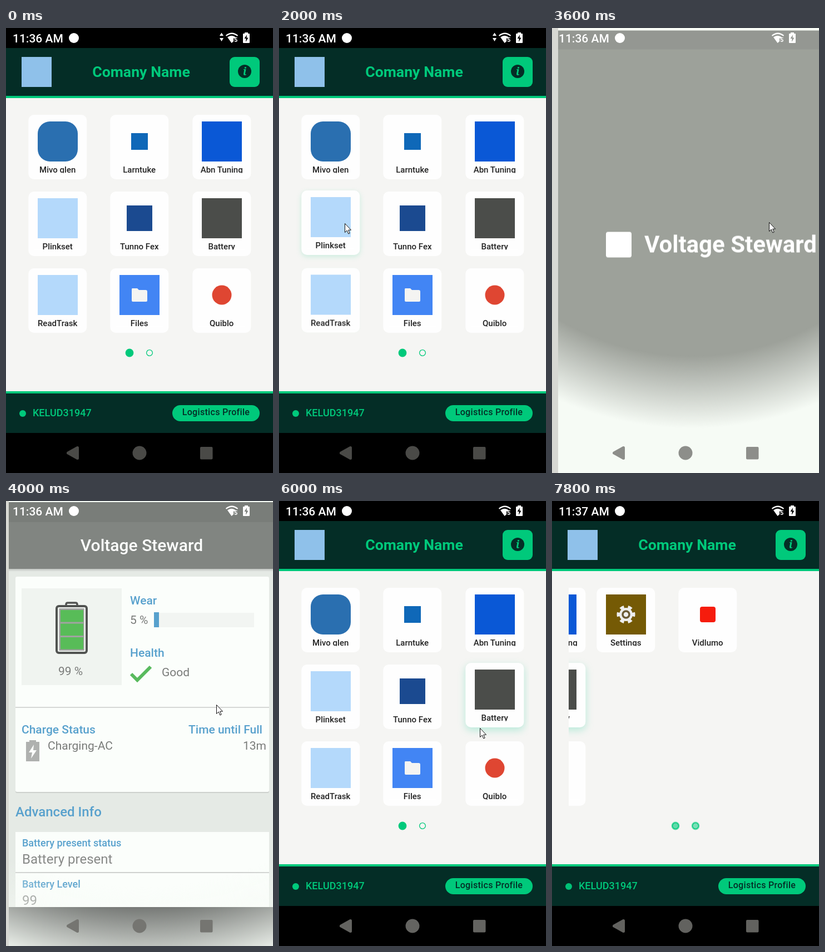
These frames come from a looping animation (480x800 px, 8 s). An HTML page:

```html
<!DOCTYPE html>
<html lang="en">
<head>
<meta charset="utf-8">
<title>Launcher demo</title>
<style>
html, body { margin: 0; width: 100%; height: 100%; overflow: hidden; background: #d7d8d3; }
svg { display: block; width: 480px; height: 800px; font-family: Roboto, sans-serif; }
text { font-size: 21px; }
.m { font-weight: 500; }
.b { font-weight: 700; }
.mid { text-anchor: middle; }
.end { text-anchor: end; }
.green { fill: #00c97b; }
.deep { fill: #042d26; }
.blue { fill: #0a74b8; }
.label { font-size: 15px; font-weight: 500; text-anchor: middle; fill: #222; }
.small { font-size: 18px; font-weight: 500; }
.value { font-size: 24px; fill: #505050; }

/* The script sets the time of every animation. */
#home, #app, #pages, .splash, #veil, #halo, #cursor, #nav, #old, #new, #up, #down, .on, .off {
  animation: 8s linear infinite paused;
}
#home { animation-name: home; }
#app { animation-name: app; }
#pages { animation-name: pages; }
.splash { animation-name: splash; }
#veil { animation-name: veil; }
#halo { animation-name: halo; transform-origin: 240px 120px; }
#cursor { animation-name: cursor; }
#nav { fill: currentColor; animation-name: nav; animation-timing-function: step-end; }
#old { animation-name: old; animation-timing-function: step-end; }
#new { animation-name: new; animation-timing-function: step-end; }
#up { animation-name: up; animation-timing-function: step-end; }
#down { animation-name: down; animation-timing-function: step-end; }
.on { animation-name: first; }
.off { animation-name: second; }
#pulse { animation: pulse 2s ease-in-out infinite paused; }
.pass { animation: pass 600ms linear var(--at) both paused; }
.stay { animation: stay 300ms linear var(--at) both paused; }

/* The app fades in over home, then both slide right until home is back. */
@keyframes home {
  0%, 42.5% { transform: none; opacity: 1; }
  45%, 57.5% { transform: none; opacity: 0; }
  60%, 62.5% { transform: translateX(-504px); opacity: 1; }
  65% { transform: translateX(-440px); }
  67.5% { transform: translateX(-296px); }
  70% { transform: translateX(-116px); }
  72.5% { transform: translateX(-20px); }
  75%, 100% { transform: translateX(0); opacity: 1; }
}
@keyframes app {
  0%, 38.75% { transform: translate(20px, 8px); opacity: 0; }
  45% { transform: translate(11px, 4.5px); opacity: 1; }
  50% { transform: translate(5px, 2px); }
  55%, 62.5% { transform: translate(0, 0); }
  65% { transform: translate(64px, 0); }
  67.5% { transform: translate(208px, 0); }
  70% { transform: translate(388px, 0); }
  72.5% { transform: translate(484px, 0); }
  75%, 100% { transform: translate(504px, 0); opacity: 1; }
}
@keyframes pages {
  0%, 77.5% { transform: translateX(0); }
  80% { transform: translateX(-180px); }
  82.5% { transform: translateX(-390px); }
  85%, 95% { transform: translateX(-420px); }
  97.5% { transform: translateX(-380px); }
  100% { transform: translateX(-200px); }
}
@keyframes first {
  0%, 78% { opacity: 1; }
  82.5%, 95% { opacity: 0; }
  97.5% { opacity: .6; }
  100% { opacity: 1; }
}
@keyframes second {
  0%, 78% { opacity: 0; }
  82.5%, 95% { opacity: 1; }
  97.5% { opacity: .5; }
  100% { opacity: 0; }
}
@keyframes splash { 0%, 45% { opacity: 1; } 50%, 100% { opacity: 0; } }
@keyframes veil {
  0%, 40% { opacity: .6; }
  45% { opacity: .46; }
  50% { opacity: .33; }
  60%, 100% { opacity: 0; }
}
@keyframes halo {
  0%, 40% { transform: scale(.75); }
  45% { transform: scale(1); }
  50% { transform: scale(1.23); }
  60%, 100% { transform: scale(1.8); }
}
@keyframes cursor {
  0%, 10% { transform: translate(180px, 830px); }
  12.5% { transform: translate(172px, 754px); }
  17.5% { transform: translate(142px, 545px); }
  22.5% { transform: translate(120px, 415px); }
  25% { transform: translate(118px, 351px); }
  29% { transform: translate(150px, 346px); }
  35% { transform: translate(388px, 346px); }
  45% { transform: translate(390px, 349px); }
  50% { transform: translate(378px, 366px); }
  60%, 62.5% { transform: translate(238px, 757px); }
  67.5% { transform: translate(278px, 528px); }
  72.5% { transform: translate(350px, 412px); }
  77.5% { transform: translate(372px, 404px); }
  82.5%, 85% { transform: translate(265px, 401px); }
  90% { transform: translate(340px, 560px); }
  92.5% { transform: translate(448px, 757px); }
  95%, 100% { transform: translate(450px, 830px); }
}
@keyframes nav {
  0% { color: #4a4a47; }
  42.5% { color: #8d8e8a; }
  47.5% { color: #757571; }
  55% { color: #646461; }
  97.5%, 100% { color: #62625f; }
}
@keyframes old { 0% { opacity: 1; } 77.5%, 100% { opacity: 0; } }
@keyframes new { 0% { opacity: 0; } 77.5%, 100% { opacity: 1; } }
@keyframes up { 0% { opacity: 1; } 27.5%, 100% { opacity: 0; } }
@keyframes down { 0% { opacity: 1; } 5% { opacity: 0; } 12.5% { opacity: 1; } 27.5%, 100% { opacity: 0; } }
@keyframes pulse { 50% { opacity: .5; } }
@keyframes pass {
  0%, 100% { transform: none; filter: drop-shadow(0 0 0 rgba(0, 201, 123, 0)); }
  40%, 60% { transform: translateY(-3px); filter: drop-shadow(0 5px 7px rgba(0, 201, 123, .25)); }
}
@keyframes stay {
  from { transform: none; filter: drop-shadow(0 0 0 rgba(0, 201, 140, 0)); }
  to { transform: translateY(-3px); filter: drop-shadow(0 5px 7px rgba(0, 201, 140, .25)); }
}
</style>
</head>
<body>
<svg viewBox="0 0 480 800">
  <defs>
    <clipPath id="grid"><rect x="30" y="130" width="420" height="440"/></clipPath>
    <clipPath id="window"><rect y="-10" width="480" height="820"/></clipPath>
    <radialGradient id="ring" gradientUnits="userSpaceOnUse" cx="240" cy="120" r="595">
      <stop offset=".78" stop-color="#f6fbf5" stop-opacity="0"/>
      <stop offset="1" stop-color="#f6fbf5"/>
    </radialGradient>
    <linearGradient id="edge" x2="0" y2="1">
      <stop stop-color="#000" stop-opacity=".25"/>
      <stop offset="1" stop-color="#000" stop-opacity="0"/>
    </linearGradient>
  </defs>

  <rect width="480" height="800" fill="#d7d8d3"/>
  <g id="home">
    <rect width="480" height="800"/>
    <rect y="36" width="480" height="692" class="deep"/>
    <rect y="122" width="480" height="535" class="green"/>
    <rect y="126" width="480" height="527" fill="#f5f5f3"/>
    <rect x="28" y="52" width="54" height="54" fill="#8fc1ea"/>
    <text x="243" y="88" class="b mid green" style="font-size:26.7px">Comany Name</text>
    <rect x="402" y="52" width="54" height="54" rx="9" class="green"/>
    <circle cx="429" cy="78" r="12" class="deep"/>
    <text x="429" y="85" class="b mid green" style="font:italic 700 19px 'Noto Serif',serif">i</text>

    <g clip-path="url(#grid)"><g id="pages"></g></g>

    <g fill="none" stroke="#00c97b" stroke-width="1.3">
      <circle cx="222" cy="584" r="5.4"/><circle cx="258" cy="584" r="5.4"/>
    </g>
    <circle cx="222" cy="584" r="7.4" class="green on"/>
    <circle cx="258" cy="584" r="7.4" class="green off"/>

    <circle id="pulse" cx="30" cy="693" r="6" class="green"/>
    <text x="48" y="698" class="small green">KELUD31947</text>
    <rect x="299" y="678" width="157" height="29" rx="14.5" class="green"/>
    <text x="377.5" y="696" class="m mid deep" style="font-size:16px;letter-spacing:.3px">Logistics Profile</text>
  </g>

  <g id="app"><g clip-path="url(#window)">
    <rect y="-10" width="480" height="20" fill="#f6fbf5"/>
    <rect width="480" height="800" fill="#dde0dd"/>
    <rect width="480" height="36" fill="#3c3e3b"/>
    <rect y="36" width="480" height="84" fill="#484a48"/>
    <rect y="120" width="480" height="5" fill="url(#edge)"/>
    <text x="239" y="88" class="m mid" fill="#fff" style="font-size:30px">Voltage Steward</text>

    <rect x="12" y="135" width="456" height="388" rx="3" fill="#b9bcb9"/>
    <rect x="12" y="134" width="456" height="387" rx="3" fill="#fdfefd"/>
    <rect x="12" y="368" width="456" height="2" fill="#c6c6c6"/>
    <rect x="23" y="155" width="180" height="174" fill="#edf0ed"/>
    <path d="M103 186V184Q103 181 106 181H120Q123 181 123 184V186" fill="none" stroke="#000" stroke-width="3.5"/>
    <rect x="86" y="187" width="54" height="84" rx="4" fill="#edf0ed" stroke="#000" stroke-width="4"/>
    <rect x="90.5" y="191" width="45" height="76" fill="#777"/>
    <g fill="#0a9c0a">
      <rect x="93" y="194" width="41" height="21.5"/>
      <rect x="93" y="218.5" width="41" height="21.5"/>
      <rect x="93" y="243" width="41" height="21.5"/>
    </g>
    <g fill="#3c3c3c">
      <text x="111" y="311" class="mid">99 %</text>
      <text x="218" y="219">5 %</text>
      <text x="275" y="313">Good</text>
      <text x="70" y="445">Charging-AC</text>
      <text x="463" y="445" class="end">13m</text>
    </g>
    <g class="blue m">
      <text x="218" y="184">Wear</text>
      <text x="218" y="278">Health</text>
      <text x="23" y="416">Charge Status</text>
      <text x="456" y="416" class="end">Time until Full</text>
      <text x="12" y="565" style="font-size:24px">Advanced Info</text>
    </g>
    <rect x="261" y="199" width="180" height="26" fill="#eff1ef"/>
    <rect x="261" y="198" width="9" height="27" class="blue"/>
    <path d="M220 309L231 320L255 296" fill="none" stroke="#0a9a12" stroke-width="6"/>
    <path d="M31 431H37V428H49V431H55V466H31Z" fill="#8c8c8c"/>
    <path d="M45 436L36 450H42L40 461L50 446H44Z" fill="#fff"/>

    <rect x="12" y="593" width="456" height="135" fill="#fdfefd"/>
    <rect x="12" y="665" width="456" height="2" fill="#bcbcbc"/>
    <text x="24" y="619" class="small blue">Battery present status</text>
    <text x="24" y="650" class="value">Battery present</text>
    <text x="24" y="693" class="small blue">Battery Level</text>
    <text x="24" y="724" class="value">99</text>
    <rect y="728" width="480" height="72"/>

    <g class="splash">
      <rect width="480" height="800" fill="#51544e"/>
      <rect width="480" height="34" fill="#40433e"/>
    </g>
    <rect id="veil" y="-10" width="480" height="820" fill="#f6fbf5"/>
    <rect id="halo" x="-900" y="-900" width="2400" height="2400" fill="url(#ring)"/>
    <g class="splash" fill="#fff">
      <rect x="86" y="362" width="46" height="46" rx="4"/>
      <text x="155" y="399" class="b" style="font-size:42px">Voltage Steward</text>
    </g>
  </g></g>

  <g fill="#fff">
    <text id="old" x="12" y="26" class="m">11:36 AM</text>
    <text id="new" x="12" y="26" class="m">11:37 AM</text>
    <circle cx="122" cy="18" r="9"/>
    <path id="up" d="M384 14L387.5 8.5L391 14Z"/>
    <path id="down" d="M384 18L387.5 24L391 18Z"/>
    <path d="M395.5 14Q406 5.500 416.5 14" fill="none" stroke="#fff" stroke-width="2.2"/>
    <path d="M398 16.5Q405.5 11 413 16.5L411 18.5H409V24L405.5 27Z"/>
    <text x="410" y="25" class="b" style="font-size:11px">5</text>
    <path fill-rule="evenodd" d="M429 8H435V10H437Q438 10 438 11V26Q438 27 437 27H427Q426 27 426 26V11Q426 10 427 10H429ZM433 12L428.5 19H431.5L431 25L435.5 17.5H432.5Z"/>
  </g>
  <g id="nav">
    <path d="M111.500 764L128.500 754.500V773.500Z" stroke="currentColor" stroke-width="5" stroke-linejoin="round"/>
    <circle cx="240" cy="764" r="12.5"/>
    <rect x="349" y="753" width="22.5" height="22.5" rx="2"/>
  </g>
  <path id="cursor" d="M.5 .5V16.5L4.2 13L6.8 19L9.2 18L6.7 12.2H11.5Z" fill="#fff" stroke="#111"/>
</svg>
<script>
const square = (size, fill, radius = 0) =>
  `<rect x="${53 - size / 2}" y="${48 - size / 2}" width="${size}" height="${size}" rx="${radius}" fill="${fill}"/>`;
const disc = (r, attrs) => `<circle cx="53" cy="48" r="${r}" ${attrs}/>`;
const folder = '<path d="M40 36H49L52 39H64Q67 39 67 42V58Q67 60 65 60H41Q39 60 39 58V38Q39 36 40 36Z" fill="#f4f4f2"/>';
const gear = disc(12, 'fill="#eee"') +
  disc(13.5, 'fill="none" stroke="#eee" stroke-width="6" pathLength="12" stroke-dasharray="1 1" stroke-dashoffset=".5"') +
  disc(6, 'fill="#eee" stroke="#6a5a35" stroke-width="3.5"');

const first = [
  ['Mivo glen', square(72, '#2a6fb0', 22)],
  ['Larntuke', square(30, '#0f68b8')],
  ['Abn Tuning', square(72, '#0a58d6')],
  ['Plinkset', square(72, '#b4d9fb'), 'pass', 1840],
  ['Tunno Fex', square(46, '#1b4a90'), 'pass', 2350],
  ['Battery', square(72, '#4b4d4a'), 'stay', 2600],
  ['ReadTrask', square(72, '#b4d9fb'), 'pass', 1440],
  ['Files', square(72, '#4285f4') + folder],
  ['Quiblo', disc(17.5, 'fill="#df4632"')],
];
const second = [
  ['Settings', square(72, '#755a05') + gear],
  ['Vidlumo', square(28, '#f61c0d', 4)],
];

// The strip at the foot of each tile cuts off the descenders.
const tile = left => ([name, icon, hover = '', at = 0], i) =>
  `<g transform="translate(${left + Math.floor(i % 3 * 147.5)} ${156 + Math.floor(i / 3) * 138})">
    <g class="${hover}" style="--at:${at}ms">
      <rect x=".3" width="105" height="116" rx="10" fill="#fefefe"/>${icon}
      <text x="52.7" y="104" class="label">${name}</text>
      <rect x="10" y="104.6" width="85" height="6" fill="#fefefe"/>
    </g>
  </g>`;
document.getElementById('pages').innerHTML =
  first.map(tile(40)).join('') + second.map(tile(460)).join('');

// The picture advances five times a second.
const animations = document.getAnimations();
function draw(now) {
  const time = Math.floor(now / 200) * 200 % 8000;
  for (const animation of animations) animation.currentTime = time;
  requestAnimationFrame(() => draw(performance.now() - start));
}
const start = performance.now();
draw(0);
</script>
</body>
</html>
```
